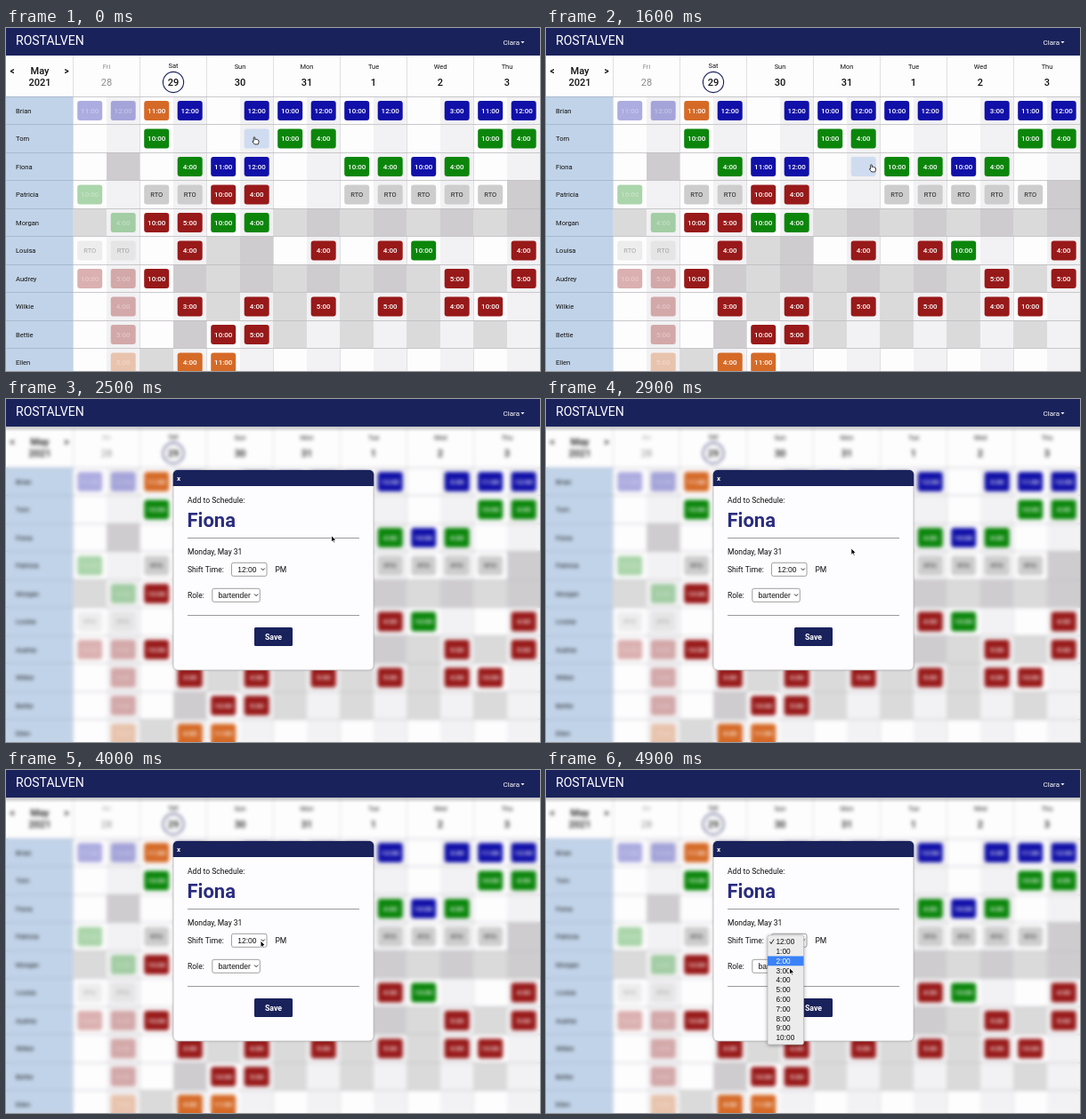
Write an HTML page with a canvas that moves like this. It is 600 px wide and 386 px high and loops after 5000 ms.

```html
<!DOCTYPE html>
<html lang="en">
<head>
<meta charset="utf-8">
<title>Shift schedule</title>
<style>
html, body { margin: 0; width: 100%; height: 100%; overflow: hidden; background: #fff; }
canvas { display: block; }
</style>
</head>
<body>
<canvas id="stage" width="600" height="386"></canvas>
<script>
const W = 600, H = 386, LOOP = 5000, STEP = 100;
const NAVY = '#1a225c';
const LEFT = 75.5, TOP = 77, SLOT = 37.5, ROW = 31.5;
const SANS = 'Roboto, sans-serif', UI = '"Liberation Sans", Arial, sans-serif';
const MODAL_AT = 2300, LIST_AT = 4400, ARROW_AT = 2100;

const fills = { b: '#1110a8', g: '#0b860b', r: '#981919', o: '#d56a27', R: '#cdcdcd' };
const days = ['Fri 28', 'Sat 29', 'Sun 30', 'Mon 31', 'Tue 1', 'Wed 2', 'Thu 3'];

// Two slots per day: colour + hour, R = time off, - = unavailable, . = open
const staff = [
  ['Brian', 'b11 b12 o11 b12 . b12 b10 b12 b10 b12 . b3 b11 b12'],
  ['Tom', '. . g10 . . . g10 g4 . . . . g10 g4'],
  ['Fiona', '. - . g4 b11 b12 . . g10 g4 b10 g4 . .'],
  ['Patricia', 'g10 . R R r10 r4 . . R R R R R -'],
  ['Morgan', '- g4 r10 r5 g10 g4 - - - - - - - -'],
  ['Louisa', 'R R . r4 - - . r4 . r4 g10 . . r4'],
  ['Audrey', 'r10 r5 r10 - - - - - - - - r5 - r5'],
  ['Wilkie', '. r4 . r3 - r4 - r5 - r5 - r4 r10 .'],
  ['Bettie', '. r5 . - r10 r5 - . - . - . - .'],
  ['Ellen', '. o5 - o4 o11 . . . . . . . . .']
].map(([name, slots]) => ({ name, slots: slots.split(' ') }));

const hours = [12, 1, 2, 3, 4, 5, 6, 7, 8, 9, 10];

// Pointer tip: time, x, y
const track = [
  [0, 279, 122.5], [100, 279, 122.5], [800, 365.5, 153.5], [2600, 365.5, 153.5],
  [3300, 308, 190], [3500, 308, 190], [3900, 286, 192], [4400, 286, 192], [5000, 272.5, 225]
];

const ctx = document.getElementById('stage').getContext('2d');

function layer(paint) {
  const c = document.createElement('canvas');
  c.width = W;
  c.height = H;
  paint(c.getContext('2d'));
  return c;
}

function rect(g, x, y, w, h, fill) {
  g.fillStyle = fill;
  g.fillRect(x, y, w, h);
}

function round(g, x, y, w, h, r, fill, stroke) {
  g.beginPath();
  g.roundRect(x, y, w, h, r);
  if (fill) { g.fillStyle = fill; g.fill(); }
  if (stroke) { g.strokeStyle = stroke; g.lineWidth = 0.7; g.stroke(); }
}

function text(g, s, x, y, size, { color = '#111', weight = 400, align = 'left', font = SANS } = {}) {
  g.font = `${weight} ${size}px ${font}`;
  g.fillStyle = color;
  g.textAlign = align;
  g.textBaseline = 'alphabetic';
  g.fillText(s, x, y + size * 0.355);
}

function line(g, pts, color, width) {
  g.beginPath();
  pts.forEach(([x, y]) => g.lineTo(x, y));
  g.strokeStyle = color;
  g.lineWidth = width;
  g.stroke();
}

function shift(g, x, y, fill) {
  round(g, x + 4.7, y + 5, 28, 22, 3, fill);
}

function paintSlot(g, code, col, row) {
  const x = LEFT + col * SLOT, y = TOP + row * ROW, pm = col % 2;
  const off = code === '-';
  rect(g, x, y, SLOT, ROW, off ? (pm ? '#cecccf' : '#dadada') : (pm ? '#f2f1f3' : '#fefdfe'));
  if (off || code === '.') return;
  const rto = code === 'R';
  g.globalAlpha = col < 2 ? 0.34 : 1;
  shift(g, x, y, fills[code[0]]);
  text(g, rto ? 'RTO' : code.slice(1) + ':00', x + SLOT / 2, y + 16, rto ? 7.5 : 8,
    { color: rto ? '#222' : '#fff', weight: rto ? 400 : 500, align: 'center' });
  g.globalAlpha = 1;
}

const grid = layer(g => {
  rect(g, 0, 0, W, H, '#fefdfe');
  rect(g, 0, TOP, LEFT, H - TOP, '#c1d3e8');
  const bold = { weight: 500, align: 'center' };
  text(g, '<', 7, 48, 10, { weight: 700, align: 'center' });
  text(g, '>', 68, 48, 10, { weight: 700, align: 'center' });
  text(g, 'May', 38, 48, 11, bold);
  text(g, '2021', 38, 61.5, 11, bold);
  days.forEach((d, i) => {
    const x = LEFT + 75 * i + 37.5, [day, num] = d.split(' ');
    const color = i ? '#111' : '#8c8c8c';
    text(g, day, x, i === 1 ? 42.5 : 43.5, 7.5, { color, align: 'center' });
    text(g, num, x, 61, 11, { color, weight: i ? 500 : 400, align: 'center' });
  });
  g.beginPath();
  g.arc(188, 61, 11.6, 0, 7);
  g.strokeStyle = NAVY;
  g.lineWidth = 1.1;
  g.stroke();
  staff.forEach(({ name, slots }, row) => {
    slots.forEach((code, col) => paintSlot(g, code, col, row));
    text(g, name, 11, TOP + row * ROW + 16, 7.6);
  });
  for (let i = 0; i < 7; i++) {
    const x = LEFT + i * 75;
    line(g, [[x, 31], [x, H]], '#d8d7da', 0.8);
  }
  staff.forEach((_, row) => {
    const y = Math.floor(TOP + row * ROW) + 0.5;
    line(g, [[0, y], [LEFT, y]], '#a3b4c8', 0.8);
    line(g, [[LEFT, y], [W, y]], '#bdbcbf', 0.8);
  });
});

const blurred = layer(g => {
  g.drawImage(grid, 0, 0);
  g.filter = 'blur(2px)';
  g.drawImage(grid, 0, 0);
});

function paintBar(g, deep) {
  if (deep) {
    const shade = g.createLinearGradient(0, 31, 0, 37);
    shade.addColorStop(0, 'rgba(0,0,0,.25)');
    shade.addColorStop(1, 'rgba(0,0,0,0)');
    rect(g, 0, 31, W, 6, shade);
  }
  rect(g, 0, 0, W, 31, NAVY);
  text(g, 'ROSTALVEN', 11, 14.5, 14, { color: '#fff' });
  text(g, 'Clara', 577, 16, 8, { color: '#fff', align: 'right' });
  g.beginPath();
  g.moveTo(578.5, 15);
  g.lineTo(582.5, 15);
  g.lineTo(580.5, 17.2);
  g.fillStyle = '#fff';
  g.fill();
}

function select(g, label, x, y, w) {
  round(g, x, y, w, 15, 2, '#fff', '#777');
  text(g, label, x + 6.7, y + 7.7, 8.5, { font: UI });
  const cx = x + w - 4.2, cy = y + 7;
  line(g, [[cx - 2, cy - 0.8], [cx, cy + 1.3], [cx + 2, cy - 0.8]], '#222', 1);
}

const modal = layer(g => {
  g.shadowColor = 'rgba(0,0,0,.25)';
  g.shadowBlur = 3;
  round(g, 188, 80, 225, 225, 5, '#fdfcfe');
  g.shadowColor = 'transparent';
  round(g, 188, 80, 225, 225, 5, null, '#bbb');
  round(g, 187.7, 80, 225.6, 18, [5, 5, 0, 0], NAVY);
  text(g, 'x', 192, 89, 8, { color: '#fff', weight: 700 });
  text(g, 'Add to Schedule:', 204, 114, 8.6);
  text(g, 'Fiona', 203.5, 136.5, 22, { color: '#2a2d80', weight: 700 });
  text(g, 'Monday, May 31', 204, 172.3, 8.5);
  text(g, 'Shift Time:', 204, 191.5, 8.5);
  text(g, 'PM', 302.5, 191.5, 8.5);
  text(g, 'Role:', 204, 220.5, 8.5);
  [156.5, 243.5].forEach(y => line(g, [[204, y], [397, y]], '#8f8f93', 0.9));
  select(g, '12:00', 253.5, 184.3, 39.5);
  select(g, 'bartender', 231.8, 213.3, 53.5);
  round(g, 279, 257, 43, 21, 1.5, NAVY);
  text(g, 'Save', 300.5, 267.7, 8.8, { color: '#fff', weight: 700, align: 'center' });
});

function paintList(g, active) {
  const pitch = 10.8, first = 193.3;
  g.save();
  g.shadowColor = 'rgba(0,0,0,.4)';
  g.shadowBlur = 4;
  g.shadowOffsetY = 1;
  round(g, 249, 186, 40.5, 123, 2, '#ececec');
  g.restore();
  round(g, 249, 186, 40.5, 123, 2, null, '#bbb');
  hours.forEach((h, i) => {
    const y = first + i * pitch, on = i === active, color = on ? '#fff' : '#111';
    if (on) rect(g, 249, y - 5.4, 40.5, pitch, '#3a82f6');
    text(g, h + ':00', 258.5, y, 8.3, { color, font: UI });
    if (!i) line(g, [[251.5, y], [253, y + 2.2], [256, y - 2.8]], color, 0.9);
  });
}

function shape(g, x, y, path, fill, stroke) {
  g.save();
  g.translate(x, y);
  g.lineJoin = 'round';
  g.lineWidth = 0.9;
  g.strokeStyle = stroke;
  g.fillStyle = fill;
  const p = new Path2D(path);
  g.fill(p);
  g.stroke(p);
  g.restore();
}

const ARROW = 'M0 0V7.6L1.8 6L3 8.6L4.2 8L3.1 5.5H5.5Z';
const HAND = 'M-.8 .7Q0 -.4 .8 .7V3L2 2.7L3.2 3.1L4.5 3.6L5 4.5V6.2L4.2 8.4H.3L-2 5.5Q-2.2 4.3 -.8 5Z';

function pointer(t) {
  let i = 1;
  while (i < track.length - 1 && track[i][0] < t) i++;
  const [t0, x0, y0] = track[i - 1], [t1, x1, y1] = track[i];
  const p = Math.min(1, Math.max(0, (t - t0) / (t1 - t0)));
  const e = p * p * (3 - 2 * p);
  return [x0 + (x1 - x0) * e, y0 + (y1 - y0) * e];
}

function paintHover(g, x, y) {
  const col = Math.floor((x - LEFT) / SLOT), row = Math.floor((y - TOP) / ROW);
  if (staff[row]?.slots[col] === '.') shift(g, LEFT + col * SLOT, TOP + row * ROW, '#cfdcf0');
}

function draw(t) {
  const [x, y] = pointer(t), open = t >= MODAL_AT;
  ctx.drawImage(open ? blurred : grid, 0, 0);
  paintBar(ctx, open);
  if (open) ctx.drawImage(modal, 0, 0);
  else paintHover(ctx, x, y);
  if (t >= LIST_AT) {
    // The highlight trails the pointer by one step
    const lagY = pointer(t - STEP)[1];
    paintList(ctx, Math.max(0, Math.round((lagY - 193.3) / 10.8)));
  }
  if (t >= ARROW_AT) shape(ctx, x, y, ARROW, '#000', '#fff');
  else shape(ctx, x, y, HAND, '#fff', '#222');
}

const start = performance.now();
function tick() {
  const t = (performance.now() - start) % LOOP;
  draw(Math.floor(t / STEP) * STEP);
  requestAnimationFrame(tick);
}
tick();
</script>
</body>
</html>
```
